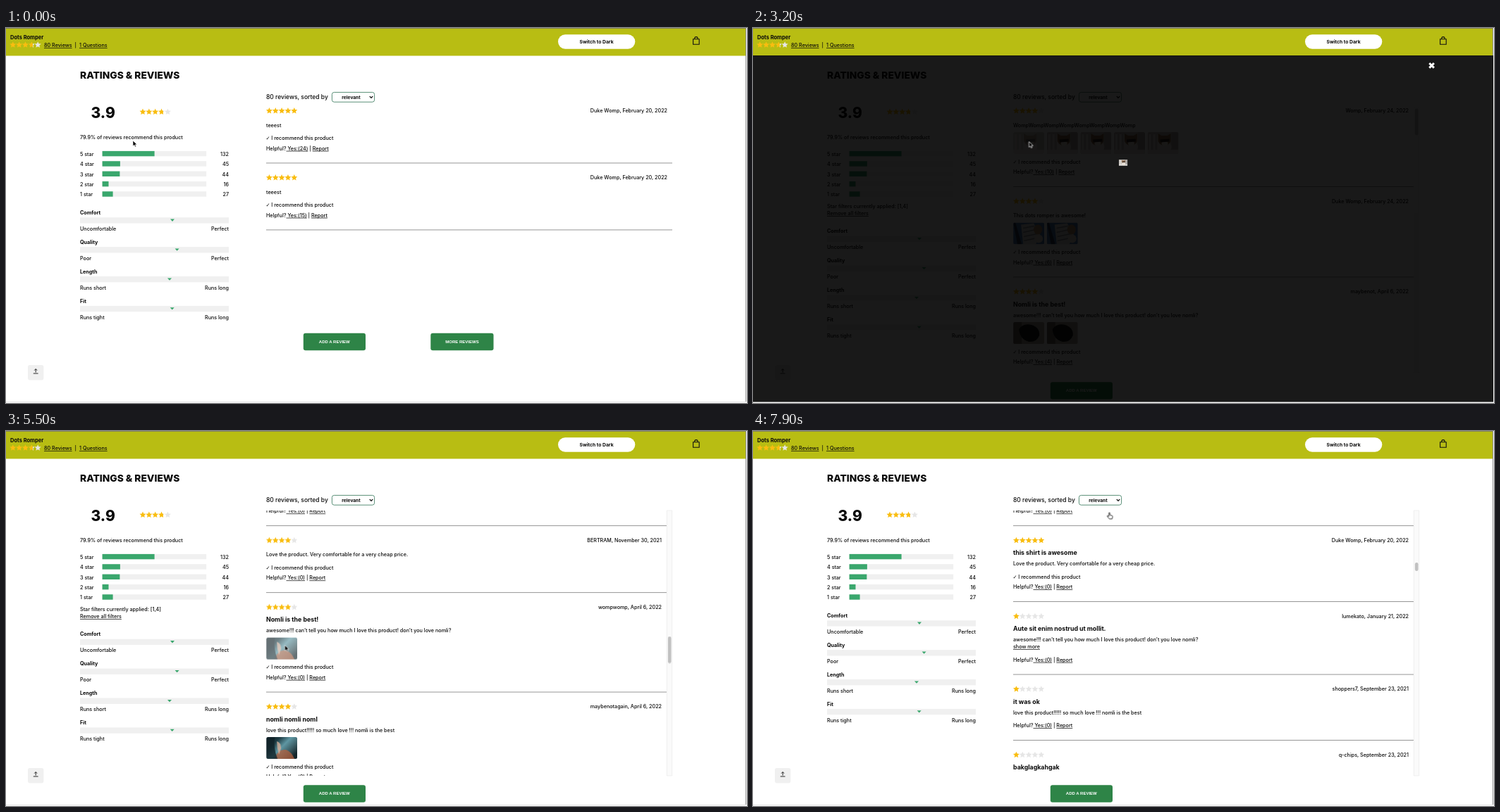
Write an HTML page that moves like this. It is 1051 by 533 pixels and loops after 8 s.

```html
<!DOCTYPE html>
<html lang="en">
<head>
<meta charset="utf-8">
<title>Ratings and reviews</title>
<style>
html, body { margin: 0; width: 100%; height: 100%; overflow: hidden; background: #fff; }
svg { display: block; width: 100%; height: 100%; }
text { font: 500 7.2px Inter, "DejaVu Sans", sans-serif; fill: #0a0a0a; white-space: pre; }
.end { text-anchor: end; }
.mid { text-anchor: middle; }
.bold { font-weight: 700; }
.title { font-size: 8.8px; font-weight: 700; }
.tick { font-family: "DejaVu Sans", sans-serif; }
.u { text-decoration: underline; }
.btn { font: bold 6px "Liberation Sans", Arial, sans-serif; fill: #fff; text-anchor: middle; }
.pic { clip-path: inset(0 round 2.5px); }

/* every animation shares one 8 s clock; moves advance in 100 ms steps */
.a { animation: 8s step-end infinite; }
.start { animation-name: start; }
.pair { animation-name: pair; }
.full { animation-name: full; }
.all { animation-name: all; }
.four { animation-name: four; }
.both { animation-name: both; }
.shift { animation-name: shift; }
.add { animation-name: add; }
.more { animation-name: more; }
.ring { animation-name: ring; }
.scroll { animation-name: scroll; }
.thumb { animation-name: thumb; }
.hover1 { animation-name: hover1; }
.hover2 { animation-name: hover2; }
.view1 { animation-name: view1; }
.view2 { animation-name: view2; }
.zoom { animation-name: zoom; }
.cursor { animation-name: cursor; }
.arrow { animation-name: arrow; }
.hand { animation-name: hand; }

@keyframes start { 0% { visibility: visible } 6.25%, 100% { visibility: hidden } }
@keyframes pair { 0%, 31.25%, 100% { visibility: hidden } 6.25% { visibility: visible } }
@keyframes full { 0%, 85%, 100% { visibility: hidden } 31.25% { visibility: visible } }
@keyframes all { 0% { visibility: hidden } 85%, 100% { visibility: visible } }
@keyframes four { 0%, 16.25%, 100% { visibility: hidden } 6.25% { visibility: visible } }
@keyframes both { 0%, 85%, 100% { visibility: hidden } 16.25% { visibility: visible } }
@keyframes shift { 0%, 85%, 100% { transform: none } 6.25% { transform: translateY(26.5px) } }
@keyframes add {
  0% { transform: none }
  6.25% { transform: translateY(26.5px) }
  31.25%, 100% { transform: translateY(69.5px) }
}
@keyframes more {
  0% { transform: none; visibility: visible }
  6.25% { transform: translateY(26.5px); visibility: visible }
  31.25%, 100% { visibility: hidden }
}
@keyframes ring { 0%, 31.25%, 100% { stroke: none } 30% { stroke: #16331f } }
@keyframes scroll {
  0% { transform: none }
  50% { transform: none; animation-timing-function: steps(4) }
  55% { transform: translateY(var(--one)); animation-timing-function: steps(6) }
  62.5%, 100% { transform: translateY(var(--two)) }
}
@keyframes thumb {
  0% { transform: none }
  50% { transform: none; animation-timing-function: steps(4) }
  55% { transform: translateY(55.5px); animation-timing-function: steps(6) }
  62.5%, 100% { transform: translateY(177.5px) }
}
@keyframes hover1 { 0%, 41.25%, 100% { opacity: 1 } 38.75% { opacity: .65 } }
@keyframes hover2 { 0%, 71.25%, 100% { opacity: 1 } 67.5% { opacity: .65 } }
@keyframes view1 { 0%, 48.75%, 100% { visibility: hidden } 40% { visibility: visible } }
@keyframes view2 { 0%, 76.25%, 100% { visibility: hidden } 70% { visibility: visible } }
@keyframes zoom {
  0%, 40%, 70% { transform: scale(.033) }
  41.25%, 71.25% { transform: scale(.3) }
  42.5%, 72.5% { transform: scale(.6) }
  43.75%, 73.75% { transform: scale(.84) }
  45%, 75% { transform: scale(.94) }
  46.25% { transform: scale(.99) }
  47.5%, 76.25%, 100% { transform: none }
}
@keyframes cursor {
  0% { transform: translate(180px, 160px); animation-timing-function: steps(4) }
  5% { transform: translate(190px, 191px) }
  7.5% { transform: translate(190px, 191px); animation-timing-function: steps(5) }
  13.75% { transform: translate(153px, 234px) }
  16.25% { transform: translate(153px, 234px); animation-timing-function: steps(6) }
  23.75% { transform: translate(279px, 312px) }
  25% { transform: translate(279px, 312px); animation-timing-function: steps(4) }
  30% { transform: translate(643px, 469px) }
  32.5% { transform: translate(643px, 469px); animation-timing-function: steps(5) }
  38.75% { transform: translate(391.5px, 161.5px) }
  41.25% { transform: translate(391.5px, 161.5px); animation-timing-function: steps(5) }
  47.5% { transform: translate(962px, 53px) }
  48.75% { transform: translate(962px, 53px); animation-timing-function: steps(4) }
  53.75% { transform: translate(624px, 317px) }
  60% { transform: translate(624px, 317px); animation-timing-function: steps(6) }
  67.5% { transform: translate(395.5px, 304.5px) }
  71.25% { transform: translate(395.5px, 304.5px); animation-timing-function: steps(3) }
  75% { transform: translate(962px, 53px) }
  76.25% { transform: translate(962px, 53px); animation-timing-function: steps(3) }
  80% { transform: translate(155.5px, 262.5px) }
  86.25% { transform: translate(155.5px, 262.5px); animation-timing-function: steps(4) }
  91.25% { transform: translate(500px, 98px) }
  93.75% { transform: translate(500px, 98px); animation-timing-function: steps(4) }
  98.75%, 100% { transform: translate(505.5px, 115.5px) }
}
@keyframes arrow {
  0%, 17.5%, 33.75%, 87.5% { visibility: visible }
  5%, 30%, 80%, 91.25%, 100% { visibility: hidden }
}
@keyframes hand {
  0%, 17.5%, 33.75%, 87.5% { visibility: hidden }
  5%, 30%, 80%, 91.25%, 100% { visibility: visible }
}
</style>
</head>
<body>
<svg viewBox="0 0 1051 533" preserveAspectRatio="none">
  <defs>
    <clipPath id="window"><path d="M365 113H950V490H365z"/></clipPath>
    <linearGradient id="part">
      <stop offset=".72" stop-color="#f9bd10"/><stop offset=".72" stop-color="#e6e6e6"/>
    </linearGradient>
    <linearGradient id="dusk" x2="1" y2=".7">
      <stop stop-color="#0c1c22"/><stop offset=".3" stop-color="#1d3a42"/>
      <stop offset=".55" stop-color="#5f97a3"/><stop offset=".8" stop-color="#3a5b62"/><stop offset="1" stop-color="#14262b"/>
    </linearGradient>
    <symbol id="a" viewBox="0 0 44 31">
      <path fill="#bdb8b2" d="M0 0h44v31H0z"/>
      <path fill="#e4e1dd" d="M2 3h3v22H2zM8 3h3v22H8zM14 3h3v22h-3zM0 25h44v6H0z"/>
      <path fill="#a9a6a2" d="M34 0h10v25H34z"/>
      <ellipse cx="25" cy="21" rx="9" ry="9" fill="#e9e2da"/>
      <path fill="#8f6b4c" d="M15 2l5 3h8l5-3v11q-3 6-9 6t-9-6z"/>
      <ellipse cx="24.5" cy="16" rx="4.5" ry="3.5" fill="#efe6dc"/>
      <path stroke="#2b2523" stroke-width="4" d="M18 12.5l13-1"/>
    </symbol>
    <symbol id="b" viewBox="0 0 44 31">
      <path fill="#4a78b4" d="M0 0h44v31H0z"/>
      <path fill="#26384e" d="M0 0h3l9 31H6z"/>
      <path fill="#dddedd" d="M11 3l18-2 9 16-6 14H14z"/>
      <path stroke="#8e9498" stroke-width="1.5" d="M14 8l16-3M14 14l18-4M15 20l19-4M15 26l18-4"/>
      <ellipse cx="35" cy="10" rx="6" ry="7" fill="#b98c64"/>
      <ellipse cx="36" cy="23" rx="6" ry="6" fill="#e9e4dc"/>
    </symbol>
    <symbol id="c" viewBox="0 0 44 31">
      <path fill="#a9a49c" d="M0 0h44v31H0z"/>
      <path fill="#6e675f" d="M0 0h12v31H0z"/>
      <path fill="#161616" d="M8 10q6-9 18-6 12 4 11 15-4 10-15 9-13-4-14-18z"/>
    </symbol>
    <symbol id="d" viewBox="0 0 44 31">
      <path fill="#eeeae6" d="M0 0h44v31H0z"/>
      <path fill="#f7e9e3" d="M8 1h27l2 29H6z"/>
      <path stroke="#c9443a" stroke-width="3.4" stroke-dasharray="3.4 3" d="M9 4h26M11 10h25M8 16h28M10 22h26M8 28h28"/>
    </symbol>
    <symbol id="e" viewBox="0 0 44 31">
      <path fill="#d5d3cf" d="M0 0h44v31H0z"/>
      <path fill="#8a8f86" d="M0 0h10v14H0z"/>
      <path fill="#b49d80" d="M0 22q18-9 36-2v11H0z"/>
      <path fill="#1f1e1d" d="M20 4q12-5 19 4 2 8-5 11-12 2-14-15z"/>
      <ellipse cx="27" cy="14" rx="5" ry="5" fill="#f3f2f0"/>
    </symbol>
    <symbol id="f" viewBox="0 0 44 31">
      <path fill="url(#dusk)" d="M0 0h44v31H0z"/>
      <path fill="#b4623f" opacity=".75" d="M12 31q4-14 16-13 8 3 12 13z"/>
      <path fill="#d9b09b" opacity=".8" d="M15 6q6 2 6 10l-3 9q-3-9-3-19z"/>
      <path fill="#122228" opacity=".8" d="M0 0h12q-2 16 4 31H0z"/>
    </symbol>
  </defs>

  <path fill="#b8bd13" d="M0 0h1050v39.4H0z"/>
  <path fill="#e4e4e4" d="M0 531h1050v1H0z"/>
  <path fill="#84845a" d="M0 0h1050v1H0z"/>
  <path fill="#8c8c8c" d="M1049 0h1v531h-1z"/>
  <g id="page">
    <rect x="462.4" y="91.4" width="60.2" height="13.8" rx="3" fill="#fff" stroke="#2f7355" stroke-width=".8"/>
    <path d="M515.8 97l2.2 2.3 2.2-2.3" fill="none" stroke="#111" stroke-width="1.2"/>
    <rect x="31" y="479" width="22.4" height="21.4" rx="3" fill="#f0f0f0"/>
    <path d="M42.2 489.6v-4.8M40.2 486.6l2-2 2 2M38.8 491h6.8" fill="none" stroke="#111" stroke-width=".9"/>
  </g>
  <g id="traits" class="a shift"></g>

  <g id="start" class="a start"></g>
  <g id="pair" class="a pair"></g>
  <g class="a full">
    <g clip-path="url(#window)"><g id="full" class="a scroll"></g></g>
    <path fill="#fafafa" stroke="#e6e6e6" stroke-width=".6" d="M937.3 113h7.4v377h-7.4z"/>
    <rect class="a thumb" x="938.9" y="114.5" width="4.6" height="38" rx="2.3" fill="#c1c1c1"/>
  </g>
  <g class="a all">
    <g id="all" clip-path="url(#window)"></g>
    <path fill="#fafafa" stroke="#e6e6e6" stroke-width=".6" d="M937.3 113h7.4v377h-7.4z"/>
    <rect x="938.9" y="187" width="4.6" height="12" rx="2.3" fill="#c1c1c1"/>
  </g>

  <g class="a add">
    <rect x="421.8" y="433.7" width="88.2" height="24.6" rx="3" fill="#2e8447"/>
    <text class="btn" x="465.8" y="447.7">ADD A REVIEW</text>
  </g>
  <g class="a more">
    <rect class="a ring" x="602.3" y="433.7" width="89.2" height="24.6" rx="3" fill="#2e8447" stroke-width=".6"/>
    <text class="btn" x="647" y="447.7">MORE REVIEWS</text>
  </g>

  <g id="head">
    <rect x="783" y="9.3" width="109.3" height="20.4" rx="10.2" fill="#fff"/>
    <path d="M974.6 15.8h8.6v7.4h-8.6zM976.7 15.8v-1a2.2 2.2 0 0 1 4.4 0v1" fill="none" stroke="#111" stroke-width="1.1"/>
  </g>

  <g id="view1" class="a view1"></g>
  <g id="view2" class="a view2"></g>

  <g class="a cursor">
    <path class="a arrow" d="M0 0V8L1.9 6.3 3.1 9 4.5 8.4 3.3 5.8H5.9z" fill="#000" stroke="#fff" stroke-width=".7"/>
    <path class="a hand" d="M-.8 1q.8-1.3 1.6 0v3l3 .8q1 .4.8 1.6l-.7 3h-4l-3-3.6q0-1.3 1.2-.8l1.1.9z" fill="#fff" stroke="#000" stroke-width=".8"/>
  </g>
</svg>
<script>
const $ = id => document.getElementById(id);

function add(parent, tag, attrs, text) {
  const el = document.createElementNS('http://www.w3.org/2000/svg', tag);
  for (const k in attrs) el.setAttribute(k, attrs[k]);
  if (text) el.textContent = text;
  parent.append(el);
  return el;
}

// y is the optical middle of the line
const label = (g, x, y, text, cls = '') => add(g, 'text', { x, y: y + 2.6, class: cls }, text);
const box = (g, x, y, width, height, fill) => add(g, 'rect', { x, y, width, height, fill });

const starPath = 'M' + Array.from({ length: 10 }, (_, i) => {
  const r = i % 2 ? 2.2 : 4.7, t = i * Math.PI / 5;
  return (r * Math.sin(t)).toFixed(2) + ' ' + (-r * Math.cos(t)).toFixed(2);
}).join('L') + 'z';

function stars(g, x, y, n) {
  for (let i = 0; i < 5; i++) {
    const fill = n >= i + 1 ? '#f9bd10' : n > i ? 'url(#part)' : '#e6e6e6';
    add(g, 'path', { d: starPath, fill, transform: `translate(${x + 4.4 + 8.85 * i} ${y + .3})` });
  }
}

// draws one review and returns where the next one begins
function review(g, y, r, edge) {
  stars(g, 369, y, r.n);
  label(g, edge - 7, y, r.by, 'end');
  if (r.title) label(g, 369, y + 18.4, r.title, 'title');
  let b = y + (r.title ? 33.4 : 20.5);
  label(g, 369, b, r.text);
  if (r.long) label(g, 369, b += 10, 'show more', 'u');
  if (r.pics) {
    [...r.pics].forEach((p, i) => add(g, 'use', {
      href: '#' + p, x: 369 + 47.6 * i, y: b + 10, width: 44.3, height: 31,
      preserveAspectRatio: 'none', class: 'pic' + (r.hover && !i ? ' a ' + r.hover : '')
    }));
    b += 33.5;
  }
  if (r.rec) {
    label(g, 368.6, b + 18.7, '✓', 'tick bold');
    label(g, 376.3, b + 18.7, 'I recommend this product');
    b += 14.4;
  }
  b += 18.7;
  const help = label(g, 369, b, 'Helpful?');
  add(help, 'tspan', { class: 'u' }, ` Yes:(${r.yes || 0})`);
  add(help, 'tspan', {}, ' | ');
  add(help, 'tspan', { class: 'u' }, 'Report');
  box(g, 369, b + 20.4, edge - 369, .9, '#8a8a8a');
  return b + 41.4;
}

function list(id, y, items, edge) {
  return items.map(r => {
    const at = y;
    y = review($(id), y, r, edge);
    return at;
  });
}

const head = $('head'), page = $('page'), traits = $('traits');

label(head, 6, 13, 'Dots Romper', 'bold').style.fontSize = '7.5px';
stars(head, 5.4, 23.7, 3.7);
label(head, 54, 24.5, '80 Reviews', 'u');
label(head, 97.6, 24.2, '|');
label(head, 104, 24.5, '1 Questions', 'u');
label(head, 837.6, 19, 'Switch to Dark', 'bold mid').style.fontSize = '6.8px';

Object.assign(label(page, 105, 69, 'RATINGS & REVIEWS').style, { fontSize: '13.8px', fontWeight: 800 });
Object.assign(label(page, 120.5, 125.2, '3.9').style, { fontSize: '21px', fontWeight: 800 });
stars(page, 189.6, 119, 3.7);
label(page, 105, 155.2, '79.9% of reviews recommend this product');
label(page, 369, 98, '80 reviews, sorted by').style.fontSize = '8.5px';
label(page, 489.5, 98, 'relevant', 'bold mid').style.fontSize = '6.6px';

[[132, 74], [45, 25.3], [44, 24.8], [16, 8.9], [27, 15]].forEach(([count, w], i) => {
  const y = 179.4 + 14.35 * i;
  label(page, 105, y, `${5 - i} star`);
  box(page, 136.6, y - 4.5, 147.6, 7.4, '#f0f0f0');
  box(page, 136.6, y - 4.5, w, 7.4, '#3aa76d');
  label(page, 316, y, String(count), 'end');
});

for (const [cls, chosen] of [['four', '[4]'], ['both', '[1,4]']]) {
  const g = add(page, 'g', { class: 'a ' + cls });
  label(g, 105, 253.3, 'Star filters currently applied: ' + chosen);
  label(g, 105, 263.4, 'Remove all filters', 'u');
}

[['Comfort', 'Uncomfortable', 'Perfect', 236], ['Quality', 'Poor', 'Perfect', 242.6],
 ['Length', 'Runs short', 'Runs long', 232], ['Fit', 'Runs tight', 'Runs long', 235.7]
].forEach(([name, low, high, x], i) => {
  const y = 262.2 + 41.9 * i;
  label(traits, 105, y, name, 'bold');
  box(traits, 105, y + 7, 211, 8.4, '#f0f0f0');
  add(traits, 'path', { d: `M${x - 3} ${y + 9.4}h6l-3 3.3z`, fill: '#3aa76d' });
  label(traits, 105, y + 23, low);
  label(traits, 316, y + 23, high, 'end');
});

const best = { title: 'Nomli is the best!', text: 'awesome!!! can’t tell you how much I love this product! don’t you love nomli?' };
const cheap = { text: 'Love the product. Very comfortable for a very cheap price.', rec: 1 };
const love = 'love this product!!!!! so much love !!! nomli is the best';
const test = { n: 5, by: 'Duke Womp, February 20, 2022', text: 'teeest', rec: 1 };
const ok = { n: 1, by: 'shoppers7, September 23, 2021', title: 'it was ok', text: 'it was ok, it was not good, it was just ok, i didn’t like it', yes: 1 };
const bad = { n: 1, by: 'q-chips, September 23, 2021', title: 'bakglagkahgak', text: 'I dislike this item so much it gave me nothing I wanted', pics: 'd', yes: 1 };
const odd = { n: 1, by: 'bindo, February 20, 2022', text: 'asdafreghfh', yes: 1 };
const chant = { n: 4, by: 'maybenot, April 6, 2022', title: 'nomlinomlinomli', text: 'nomli is the best nomli nomli nomli nomli is the best', pics: 'ee', rec: 1, yes: 1 };
const bertram = { ...cheap, n: 4, by: 'BERTRAM, November 30, 2021' };
const shirt = { ...cheap, n: 5, by: 'Duke Womp, February 20, 2022', title: 'this shirt is awesome' };

const top2 = [
  { n: 4, by: 'Womp, February 24, 2022', text: 'Womp'.repeat(8), pics: 'aaaaa', rec: 1, yes: 10, hover: 'hover1' },
  { n: 4, by: 'Duke Womp, February 24, 2022', text: 'This dots romper is awesome!', pics: 'bb', rec: 1, yes: 6 }
];
const shirt4 = { ...shirt, n: 4 };
const filtered = [
  ...top2,
  { ...best, n: 4, by: 'maybenot, April 6, 2022', pics: 'cc', rec: 1, yes: 4 },
  odd, ok, ok, bad, odd, chant,
  { ...chant, yes: 0 }, bertram, shirt4, shirt4, { ...chant, yes: 0 }, shirt4, bertram,
  bertram,
  { ...best, n: 4, by: 'wompwomp, April 6, 2022', pics: 'f', rec: 1, hover: 'hover2' },
  { n: 4, by: 'maybenotagain, April 6, 2022', title: 'nomli nomli noml', text: love, pics: 'f', rec: 1 }
];

list('start', 117.5, [{ ...test, yes: 24 }, { ...test, yes: 15 }], 945);
list('pair', 117.5, top2.map(r => ({ ...r, hover: '' })), 945);
const tops = list('full', 117.5, filtered, 937);
$('full').style.setProperty('--one', 125.3 - tops[5] + 'px');
$('full').style.setProperty('--two', 155.2 - tops[16] + 'px');
list('all', 60.2, [
  bertram, shirt,
  { n: 1, by: 'lumekato, January 21, 2022', title: 'Aute sit enim nostrud ut mollit.', text: best.text, long: 1 },
  { ...ok, text: love, yes: 0 },
  { ...bad, text: 'NO EVER SORRY', pics: '', yes: 0 }
], 937);

for (const [id, pic] of [['view1', 'a'], ['view2', 'f']]) {
  const g = $(id);
  add(g, 'rect', { x: 0, y: 39, width: 1050, height: 492.5, 'fill-opacity': .9 });
  add(g, 'path', { d: 'M959.3 50l6.6 6.6M965.9 50l-6.6 6.6', stroke: '#fff', 'stroke-width': 2.9 });
  const frame = add(g, 'g', { transform: 'translate(525 191.3)' });
  const zoom = add(frame, 'g', { class: 'a zoom' });
  add(zoom, 'use', { href: '#' + pic, x: -183, y: -129, width: 366, height: 258 });
}
</script>
</body>
</html>
```
